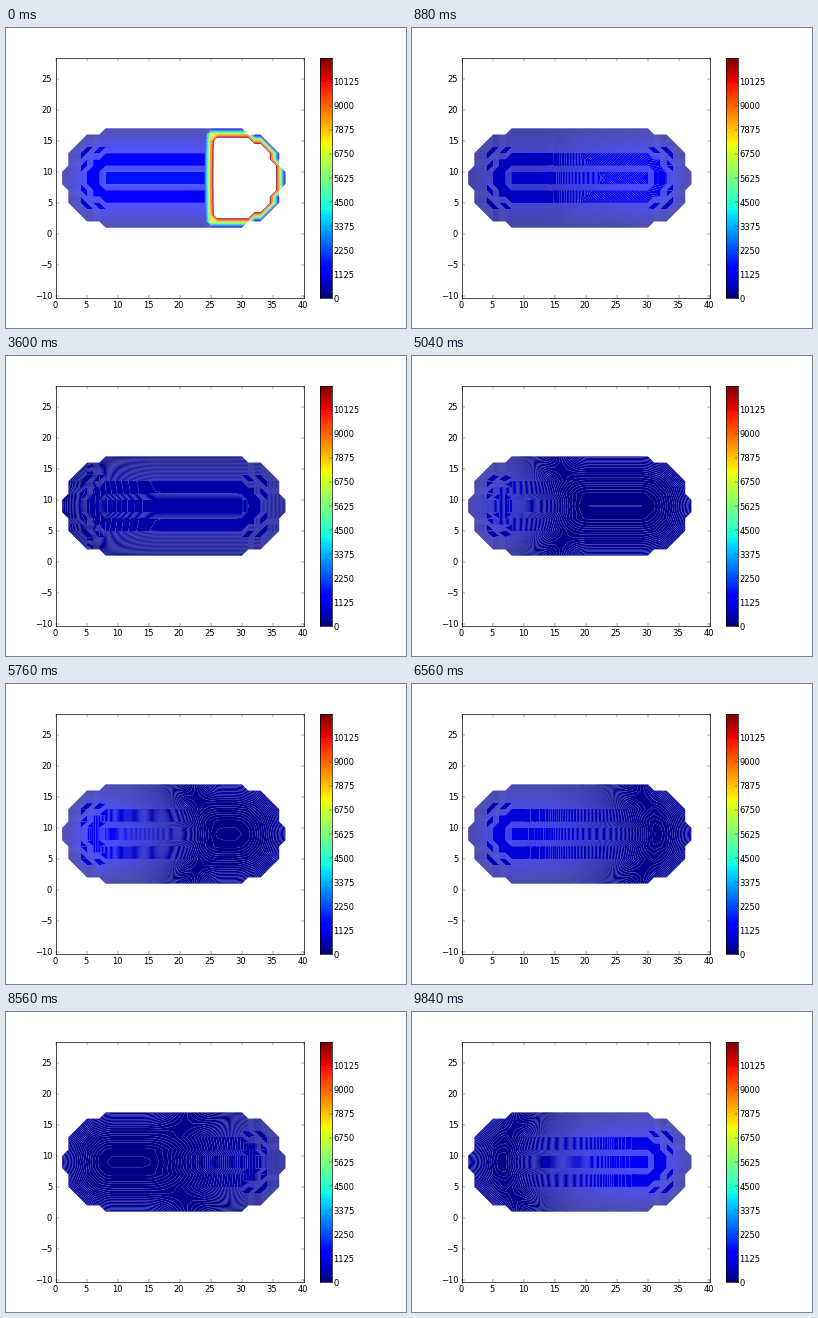
Write a matplotlib script that moves like this. It is 400 px wide and 300 px high and loops after 9920 ms.

```python
import numpy as np
import matplotlib.pyplot as plt
from matplotlib.animation import FuncAnimation
from matplotlib.colors import Normalize
from matplotlib.transforms import ScaledTranslation

FRAMES, STEP_MS = 124, 80
TOP, GAP = 11250, 11.25
PERIOD, RIGHT_PEAK, DECAY = 7840, 2000, 24000
LEVELS = np.arange(0, TOP, GAP)
NORM = Normalize(0, LEVELS[-1])

plt.rcParams.update({
    "font.family": "DejaVu Sans", "font.size": 12, "axes.linewidth": 1.0,
    "text.kerning_factor": 6,
    "xtick.direction": "in", "ytick.direction": "in",
    "xtick.top": True, "ytick.right": True,
    "xtick.major.size": 4, "ytick.major.size": 4,
    "xtick.major.width": 0.5, "ytick.major.width": 0.5,
    "xtick.major.pad": 4, "ytick.major.pad": 4,
})

# Stadium-shaped basin: distance from its middle line, in whole-number rings
x, y = np.meshgrid(np.arange(39), np.arange(19))
dist = np.hypot(np.maximum(np.maximum(9 - x, x - 29), 0), y - 9)
outside = dist > 8.1
ring = np.clip(np.ceil(dist - 0.42), 0, 8)

# Flat core, flat shelf, then a slope down to the wall
profile = np.where(ring < 2, 1600, 1375 - 306 * np.clip(ring - 4, 0, None))


def smooth(u):
    u = np.clip(u, 0, 1)
    return u * u * (3 - 2 * u)


def swell(phase):
    return 0.05 + 1.1 * np.cos(phase / 2) ** 6


def strength(t):
    """Sloshing between the two ends, fading in from a flat start."""
    phase = 2 * np.pi * (t - RIGHT_PEAK) / PERIOD
    left, right = swell(phase - np.radians(172)), swell(phase)
    middle = 16 - 12 * np.sin(phase)
    ramp = smooth((x - middle + 12) / 24)
    g = np.exp(-t / DECAY) * (left + (right - left) * ramp)
    return 1 + (g - 1) * smooth(t / 1600)


def field(t):
    g = strength(t)
    calm = np.clip(1 - g, 0, 1) ** 10
    z = g * profile + 450 * calm * (dist / 8.1) ** 2
    # Opening surge on the right, spreading left as it dies away
    front = 24 - t / 100
    depth = np.clip(np.minimum(x - front, 8 - ring), 0, None)
    z = z + 7000 * np.exp(-t / 160) * depth
    return np.ma.array(z, mask=outside)


fig = plt.figure(figsize=(8, 6), dpi=50, facecolor="white")
ax = fig.add_axes([0.125, 0.1, 0.62, 0.8])
ax.set_xlim(0, 40)
ax.set_ylim(9 - 600 / 31, 9 + 600 / 31)
ax.set_xticks(range(0, 41, 5))
ax.set_yticks(range(-10, 26, 5))

bar = fig.add_axes([0.78375, 0.1, 0.03, 0.8])
bar.imshow(LEVELS[:, None], cmap="jet", norm=NORM, aspect="auto",
           origin="lower", extent=(0, 1, 0, TOP), interpolation="nearest")
bar.set_xticks([])
bar.set_yticks(range(0, TOP, 1125))
bar.tick_params(axis="y", left=False, right=True,
                labelleft=False, labelright=True)

# Labels sit one pixel to the left
nudge = ScaledTranslation(-1 / 50, 0, fig.dpi_scale_trans)
for axis in (ax.xaxis, ax.yaxis, bar.yaxis):
    for tick in axis.get_major_ticks():
        for label in (tick.label1, tick.label2):
            label.set_transform(label.get_transform() + nudge)

shown = []


def draw(i):
    while shown:
        shown.pop().remove()
    z = field(i * STEP_MS)
    used = LEVELS[LEVELS < z.max() + GAP]
    shown.append(ax.contourf(x, y, z, levels=used, cmap="jet", norm=NORM,
                             antialiased=True))
    return shown


anim = FuncAnimation(fig, draw, frames=FRAMES, interval=STEP_MS,
                     repeat=True, repeat_delay=0, blit=False)
plt.show()
```
